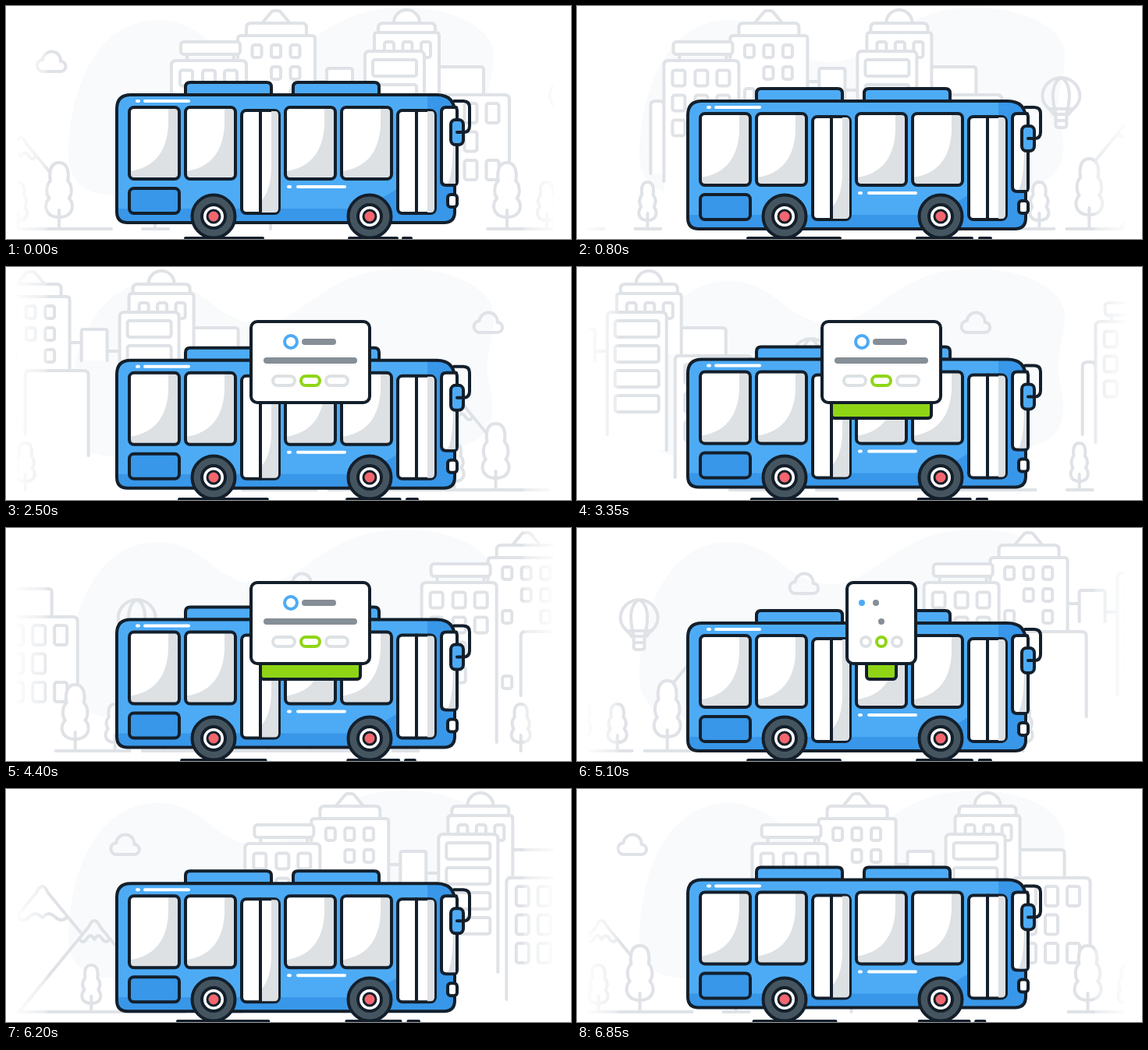
Write an HTML page that moves like this. It is 724 px wide and 299 px high and loops after 6.9 s.

```html
<!DOCTYPE html>
<html lang="en">
<head>
<meta charset="utf-8">
<title>City bus</title>
<style>
  html, body { margin: 0; width: 100%; height: 100%; overflow: hidden; background: #fff; }
  svg { display: block; width: 100%; height: 100%; }
  .line { fill: none; stroke-width: 4; stroke-linecap: round; stroke-linejoin: round; }
  .city { stroke: #dfe2e6; }
  .ink { stroke: #131f2b; }
</style>
</head>
<body>
<svg viewBox="0 0 724 299">
  <defs>
    <linearGradient id="fade" gradientUnits="userSpaceOnUse" x1="14" y1="0" x2="702" y2="0">
      <stop offset="0" stop-color="#fff" stop-opacity=".12"/>
      <stop offset=".05" stop-color="#fff" stop-opacity=".6"/>
      <stop offset=".06" stop-color="#fff"/>
      <stop offset=".942" stop-color="#fff"/>
      <stop offset=".946" stop-color="#fff" stop-opacity=".65"/>
      <stop offset="1" stop-color="#fff" stop-opacity=".12"/>
    </linearGradient>
    <mask id="edges" maskUnits="userSpaceOnUse" x="0" y="0" width="724" height="299">
      <rect x="14" width="688" height="299" fill="url(#fade)"/>
    </mask>
    <g id="town" class="line city"></g>
  </defs>
  <path fill="#f8fafc" d="M80 190C80 130 105 18 195 18C255 18 268 72 325 72C385 72 405 2 510 2C580 2 625 32 625 62
    C625 95 612 115 618 145C628 180 630 228 570 231L140 243C98 243 80 222 80 190Z"/>
  <g mask="url(#edges)"><g id="strip"></g></g>
  <path id="road" class="line ink"/>
  <g id="bus" class="line ink"></g>
  <g id="wheels" class="line ink"></g>
  <g id="card" class="line ink"></g>
</svg>
<script>
const LOOP = 6900, CYCLE = 6950, WIDTH = 874, BOUNCES = 13;
const BLUE = '#4dabf5', DEEP = '#3897e9', SHADE = '#dde1e4', GREY = '#868e96', GREEN = '#8fd516';
const $ = id => document.getElementById(id);

const path = (d, attrs = '') => `<path d="${d}" ${attrs}/>`;
const box = (x1, y1, x2, y2, r, attrs = 'fill="#fff"') =>
  `<rect x="${x1}" y="${y1}" width="${x2 - x1}" height="${y2 - y1}" rx="${r}" ${attrs}/>`;
const circle = (x, y, r, attrs = '') => `<circle cx="${x}" cy="${y}" r="${r}" ${attrs}/>`;
const paint = color => `fill="${color}" stroke="none"`;

// White block whose side walls may stop at different heights.
function block(x1, x2, top, left, right, r = 6) {
  const roof = `V${top + r}Q${x1} ${top} ${x1 + r} ${top}H${x2 - r}Q${x2} ${top} ${x2} ${top + r}`;
  const low = Math.max(left, right);
  return path(`M${x1} ${low}${roof}V${low}Z`, paint('#fff')) + path(`M${x1} ${left}${roof}V${right}`);
}

// cells: [column, row] pairs of left and top positions
const panes = (cells, w, h) => cells.map(([x, y]) => box(x, y, x + w, y + h, 3)).join('');
const at = (rows, ...xs) => rows.flatMap(y => xs.map(x => [x, y]));

function tree(x, top, bottom, w) {
  const h = (bottom - top) / 3, a = top + h, b = top + 2 * h;
  const crown = `M${x} ${top}C${x + w * .85} ${top} ${x + w * .7} ${a - 3} ${x + w * .65} ${a}` +
    `C${x + w} ${a + 5} ${x + w} ${b - 6} ${x + w * .75} ${b - 1}` +
    `C${x + w * 1.2} ${b + 6} ${x + w * 1.1} ${bottom} ${x} ${bottom}` +
    `C${x - w * 1.1} ${bottom} ${x - w * 1.2} ${b + 6} ${x - w * .75} ${b - 1}` +
    `C${x - w} ${b - 6} ${x - w} ${a + 5} ${x - w * .65} ${a}` +
    `C${x - w * .7} ${a - 3} ${x - w * .85} ${top} ${x} ${top}Z`;
  return path(crown, 'fill="#fff"') + path(`M${x} ${bottom - 9}V286`);
}

function mountain(x, top, leftEnd, rightEnd, cap) {
  const k = 1.22, side = (y, s) => `${x + s * (y - top) / k} ${y}`;
  const slope = `M${side(leftEnd, -1)}L${side(top + 9, -1)}Q${x} ${top - 7} ${side(top + 9, 1)}L${side(rightEnd, 1)}`;
  const w = (cap - top) / k, q = w / 2;
  const wave = `M${x - w} ${cap}q${q / 2} 8 ${q} 0q${q / 2} -8 ${q} 1q${q / 2} -9 ${q} -1q${q / 2} 8 ${q} 0`;
  return path(slope) + path(wave);
}

function balloon(x) {
  return `<g transform="translate(${x} 0)">` +
    path('M-10 139C-12 133 -24 128 -24 116A24 24 0 0 1 24 116C24 128 12 133 10 139Z') +
    path('M-7 138C-14 112 -10 97 0 92C10 97 14 112 7 138M-16 132H16M-7 139V147M7 139V147') +
    box(-7, 147, 7, 156, 3, '') + '</g>';
}

const cloud = x => `<g transform="translate(${x} 0)">` +
  path('M-12 84H12A6.5 6.5 0 0 0 12 71A11.5 11.5 0 0 0 -11 69A7.6 7.6 0 0 0 -12 84Z') + '</g>';

$('town').innerHTML = [
  cloud(932),
  // tower with a pitched top
  path('M329 21L339 9Q341 6 344 6H348Q351 6 353 9L363 21', 'fill="#fff"'),
  block(308, 385, 22, 38, 38),
  block(411, 444, 80, 120, 120, 3),
  path('M396 97H411M444 108H459'),
  block(297, 396, 38, 66, 133, 4),
  panes([...at([50], 315.5, 340, 364.5), ...at([78], 340, 364.5), ...at([106], 315.5, 364.5), [315.5, 190]], 12, 16),
  block(339, 420, 133, 215, 242),
  // wide block with a roof slab
  block(195, 212, 122, 215, 130),
  block(212, 308, 70, 225, 275),
  path('M232 62V70M292 62V70'),
  box(224, 46, 300, 62, 4),
  panes([...at([82.5], 223, 252, 280), ...at([114.5], 223, 252, 280), ...at([146.5], 223, 252), [252, 178.5]], 16, 20),
  // domed tower
  path('M497 21A16.5 16 0 0 1 530 21', 'fill="#fff"'),
  block(477, 550, 22, 34, 34),
  block(550, 612, 78, 112, 112, 4),
  block(472, 555, 34, 58, 112, 4),
  panes(at([46], 485, 508.5, 532), 12, 20),
  block(460, 536, 58, 215, 235),
  panes(at([69, 101, 133, 165], 470), 56, 21),
  block(547, 645, 114, 270, 210),
  panes([...at([125, 161.5, 198], 559.5, 587.5), ...at([125, 198], 615.5)], 16, 25),
  balloon(721),
  mountain(826, 124, 215, 184, 164),
  mountain(893, 168, 286, 213, 192),
  path('M617 286H712M728 286H1009M1049 286H1082'),
  tree(339, 226, 275, 12), tree(642, 201, 271, 17), tree(693, 226, 275, 12),
  tree(757, 196, 268, 17), tree(889, 226, 275, 12), tree(942, 201, 271, 17), tree(1065, 226, 275, 11)
].join('');
$('strip').innerHTML = [-1, 0, 1].map(n => `<use href="#town" x="${n * WIDTH}"/>`).join('');

const busWindow = x => box(x, 130, x + 64, 222, 6, paint('#fff')) +
  path(`M${x + 50} 130V153Q${x + 47} 205 ${x + 1} 212V222H${x + 58}Q${x + 64} 222 ${x + 64} 216V136Q${x + 64} 130 ${x + 58} 130Z`, paint(SHADE)) +
  box(x, 130, x + 64, 222, 6, '');
// foot: outline of the shade's lower end, relative to the door's left edge
const door = (x, foot) => `<g transform="translate(${x} 0)">` + box(0, 134, 48, 266, 6) +
  path(`M38 135H43Q47 135 47 140V260Q47 265 42 265${foot}Z`, paint(SHADE)) +
  path('M24 134V266') + '</g>';
const body = 'M160 114H552Q575 114 575 138V264Q575 278 561 278H156Q142 278 142 264V132Q142 114 160 114Z';

$('bus').innerHTML = [
  ...[230, 368].map(x => path(`M${x} 114V104Q${x} 98 ${x + 6} 98H${x + 104}Q${x + 110} 98 ${x + 110} 104V114Z`, `fill="${BLUE}"`)),
  path(body, paint(BLUE)),
  path('M540 114H552Q575 114 575 138V264Q575 278 561 278H156Q142 278 142 264V260H440Q535 238 540 165Z', paint(DEEP)),
  path(body),
  path('M168 122H170M178 122H234M362 232H364M374 232H434', 'stroke="#fff"'),
  [158, 230, 358, 430].map(busWindow).join(''),
  box(158, 234, 222, 266, 6, `fill="${DEEP}"`),
  door(302, 'H25V250Q38 236 38 205'), door(502, 'H38'),
  path('M577 130H564Q558 130 558 136V224Q558 230 564 230H573Q578 230 578 225V134Z', 'fill="#fff"'),
  path('M576 170V228H566Q573 215 573 170Z', paint(SHADE)),
  path('M574 122H586Q594 122 594 130V154Q594 162 586 162'),
  box(570, 146, 586, 178, 6, `fill="${BLUE}"`),
  path('M578 162H586'),
  box(566, 242, 578, 258, 4)
].join('');

$('wheels').innerHTML = [266, 466].map(x =>
  circle(x, 270, 27.5, 'fill="#455560"') + circle(x, 270, 15, 'fill="#fff"') +
  circle(x, 270, 8, 'fill="#f2666e" stroke-width="3"')).join('');

const mix = (a, b, k) => a + (b - a) * k;
function ramp(t, from, to) {
  const k = Math.min(1, Math.max(0, (t - from) / (to - from)));
  return k * k * (3 - 2 * k);
}

function drawCard(t) {
  const size = ramp(t, 850, 1100) - ramp(t, 5100, 5400);
  const open = ramp(t, 1100, 1400) - ramp(t, 4750, 5100);
  const slip = ramp(t, 2450, 2800);
  const half = mix(44, 76, open), slipHalf = mix(19, 64, open);
  const bar = (x1, x2, y) => path(`M${x1} ${y}H${x2 + .01}`, `stroke="${GREY}" stroke-width="8"`);
  const pill = (x, w, color) => box(x - w, 140, x + w, 152, 6, `fill="#fff" stroke="${color}"`);
  const card = $('card');
  card.setAttribute('visibility', size > .01 ? 'visible' : 'hidden');
  card.setAttribute('transform', `translate(390 122) scale(${size}) translate(-390 -122)`);
  card.innerHTML =
    box(390 - slipHalf, 130 + 22 * slip, 390 + slipHalf, 172 + 22 * slip, 4, `fill="${GREEN}"`) +
    box(390 - half, 70, 390 + half, 174, 8) +
    circle(365, 96, mix(2, 8, open), `stroke="${BLUE}"`) +
    bar(383, mix(383, 419, open), 96) +
    bar(mix(390, 334, open), mix(390, 446, open), 120) +
    pill(mix(370, 356, open), mix(6, 14, open), SHADE) +
    pill(390, mix(6, 12, open), t >= 2400 ? GREEN : SHADE) +
    pill(mix(410, 424, open), mix(6, 14, open), SHADE);
}

function draw(now) {
  const t = Math.floor(now % LOOP / 50) * 50;
  const turn = t / CYCLE;
  const dip = (1 - Math.cos(turn * BOUNCES * 2 * Math.PI)) / 2;
  const dash = (a1, a2, b1, b2) => `M${mix(a1, a2, dip)} 298H${mix(b1, b2, dip)}`;
  $('strip').setAttribute('transform', `translate(${-WIDTH * turn} 0)`);
  $('bus').setAttribute('transform', `translate(0 ${8 * dip})`);
  $('road').setAttribute('d', dash(230, 219, 329, 337) + dash(440, 436, 501, 506) + dash(509, 516, 519, 530));
  drawCard(t);
}

const start = performance.now();
function tick() {
  draw(performance.now() - start);
  requestAnimationFrame(tick);
}
tick();
</script>
</body>
</html>
```
